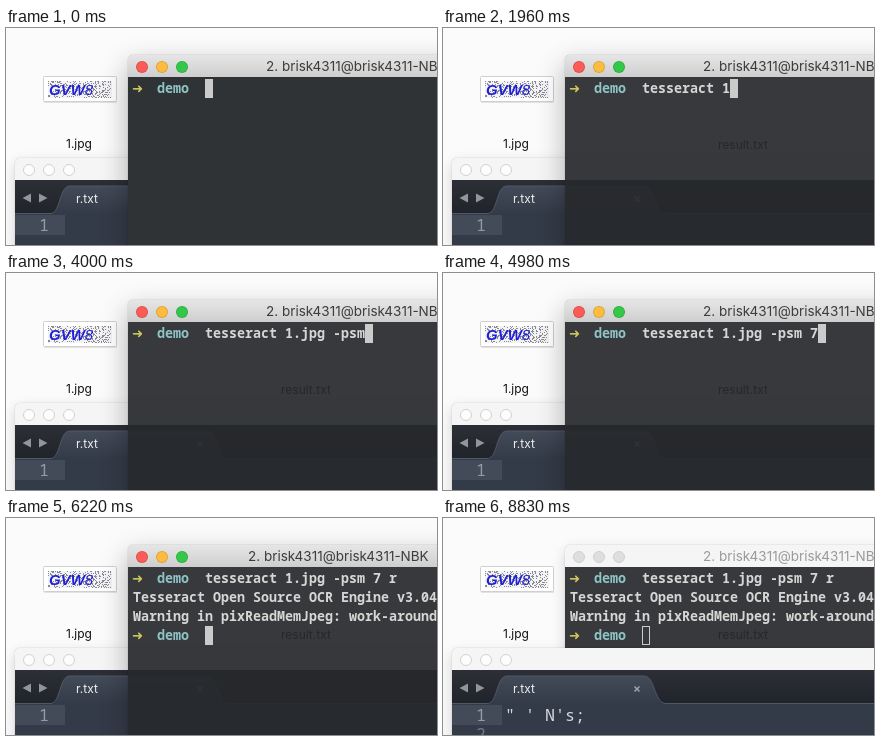
Recreate the animation shown at these times as an HTML page. Size 431 px wide and 217 px high, loop 8.93 s.

```html
<!DOCTYPE html>
<html lang="en">
<head>
<meta charset="utf-8">
<title>Terminal demo</title>
<style>
  html, body { margin: 0; width: 100%; height: 100%; overflow: hidden; background: #fbfbfb; }
  #stage { position: relative; width: 431px; height: 217px; overflow: hidden; background: #fbfbfb; }
  svg { position: absolute; left: 0; top: 0; overflow: hidden; }
  text { white-space: pre; }
  .ui { font: 12px Inter, "Open Sans", sans-serif; }
  .mono { font: 600 13.33px "Noto Sans Mono", "DejaVu Sans Mono", monospace; fill: #d6d6d4; }
  .code { font: 16.67px "Noto Sans Mono", "DejaVu Sans Mono", monospace; }
  .arrow { font: 13.3px "DejaVu Sans", sans-serif; fill: #cfc75e; }
  .dir { fill: #8fc4c6; }
  .win { position: absolute; width: 620px; height: 400px; border-radius: 5px 5px 0 0;
         box-shadow: 0 5px 14px rgba(0,0,0,.16), 0 0 1px rgba(0,0,0,.4); }
  .win.active { box-shadow: 0 10px 28px rgba(0,0,0,.3), 0 0 1px rgba(0,0,0,.5); }
  .bar { height: 22px; border-radius: 5px 5px 0 0; background: #f5f5f5; }
  .active .bar { background: linear-gradient(#e6e6e6, #cecece); }
  .light { position: absolute; top: 5.5px; width: 12px; height: 12px; border-radius: 50%;
           box-sizing: border-box; border: 1px solid #d2d2d2; background: #fdfdfd; }
  .light:nth-child(1) { left: 8px; }
  .light:nth-child(2) { left: 28px; }
  .light:nth-child(3) { left: 48px; }
  .active .light { border-color: rgba(0,0,0,.12); }
  .active .light:nth-child(1) { background: #fc5b57; }
  .active .light:nth-child(2) { background: #fdbc40; }
  .active .light:nth-child(3) { background: #34c84a; }
  #term { left: 122px; top: 27px; z-index: 2; }
  #term .light { border-color: #d0d0d0; background: #dedede; }
  #term.active .light { border-color: rgba(0,0,0,.12); }
  #term.active .light:nth-child(1) { background: #fc5b57; }
  #term.active .light:nth-child(2) { background: #fdbc40; }
  #term.active .light:nth-child(3) { background: #34c84a; }
  #screen { height: 378px; }
  #termText { z-index: 2; }
  #title { font: 13.5px Inter, "Open Sans", sans-serif; }
  #editor { left: 9px; top: 130px; z-index: 1; }
  #editor.front { z-index: 3; }
  #pane { left: 0; top: 22px; }
</style>
</head>
<body>
<div id="stage">
  <svg width="431" height="217">
    <rect x="38" y="50" width="73" height="25" rx="1" fill="#000" opacity=".1"/>
    <rect x="37.5" y="48.5" width="73" height="25" rx="1" fill="#fff" stroke="#cfcfcf"/>
    <rect x="42" y="53" width="64" height="17" fill="#f3f3f5"/>
    <path id="noise" stroke="#8a8a92" fill="none"/>
    <text x="43" y="67" font-family="Liberation Sans, sans-serif" font-size="15" font-style="italic" fill="#2020d8"><tspan font-weight="700">GVW</tspan>8</text>
    <text class="ui" x="60" y="120" fill="#111">1.jpg</text>
    <text class="ui" x="275" y="121" fill="#111">result.txt</text>
  </svg>

  <div id="editor" class="win">
    <div class="bar"><i class="light"></i><i class="light"></i><i class="light"></i></div>
    <svg id="pane" width="620" height="378">
      <defs>
        <linearGradient id="strip" x2="0" y2="1"><stop stop-color="#2c2f36"/><stop offset="1" stop-color="#20232a"/></linearGradient>
        <linearGradient id="tab" x2="0" y2="1"><stop stop-color="#434a58"/><stop offset="1" stop-color="#343b48"/></linearGradient>
      </defs>
      <rect width="620" height="34" fill="url(#strip)"/>
      <rect y="34" width="620" height="344" fill="#343b48"/>
      <path d="M36 34C46 32 44 6 55 6H192C203 6 202 32 213 34Z" fill="url(#tab)"/>
      <path d="M0 33.500H36C46 32 44 6 55 6H192C203 6 202 32 213 33.500H620" fill="none" stroke="#505868"/>
      <path d="M16 13.500V22.500L7.500 18ZM24 13.500V22.500L32.500 18Z" fill="#92969c"/>
      <text class="ui" x="61" y="23" fill="#f0f0f0">r.txt</text>
      <path d="M182.500 16.500l5 5m0-5l-5 5" stroke="#a4a8b0" stroke-width="1.400"/>
      <rect y="35" width="50" height="20" fill="#434b59"/>
      <text class="code" x="24" y="51" fill="#939baa">1</text>
      <g id="result" class="code">
        <text x="24" y="70" fill="#737b8a">2</text>
        <text x="53" y="51" fill="#d3d9e0">" ' N's;</text>
      </g>
    </svg>
  </div>

  <div id="term" class="win">
    <div class="bar"><i class="light"></i><i class="light"></i><i class="light"></i></div>
    <div id="screen"></div>
    <svg width="309" height="190" viewBox="122 27 309 190">
      <text id="title" y="43">2. brisk4311@brisk4311-NBK</text>
      <text class="arrow" x="126" y="65">➜</text>
      <text class="mono dir" x="151" y="65">demo</text>
      <text class="mono" id="command" x="199" y="65"></text>
      <text class="mono" id="version" x="127" y="84">Tesseract Open Source OCR Engine v3.04.00 with Leptonica</text>
      <text class="mono" id="warning" x="127" y="103">Warning in pixReadMemJpeg: work-around: writing to a temp file</text>
      <g id="prompt">
        <text class="arrow" x="126" y="122">➜</text>
        <text class="mono dir" x="151" y="122">demo</text>
      </g>
      <rect id="cursor"/>
    </svg>
  </div>
</div>

<script>
const LOOP = 8930, COL = 8, ROW = 19;
const $ = id => document.getElementById(id);
const command = 'tesseract 1.jpg -psm 7 r';

// [time, characters of the command shown, mistyped tail]
const typing = [
  [0, 0], [350, 1], [530, 2], [800, 3], [890, 4], [1070, 10], [1960, 11], [2050, 12],
  [2220, 13], [2310, 14], [2400, 15], [2480, 16], [2570, 17],
  [3020, 17, 's'], [3290, 17, 'sp'], [3560, 17, 's'], [3650, 17],
  [3820, 18], [3910, 19], [4000, 20], [4260, 21], [4440, 21, '6'], [4800, 21],
  [4980, 22], [5070, 23], [5240, 24]
];

function typedAt(t) {
  const [, count, typo = ''] = typing.filter(step => step[0] <= t).pop();
  return command.slice(0, count) + typo;
}

function show(id, visible) {
  $(id).setAttribute('visibility', visible ? 'visible' : 'hidden');
}

function placeCursor(x, y, hollow) {
  const inset = hollow ? 0.5 : 0;
  const attrs = {
    x: x + inset, y: y + inset, width: COL - 2 * inset, height: ROW - 2 * inset,
    fill: hollow ? 'none' : '#cbcbcb', stroke: hollow ? '#cbcbcb' : 'none'
  };
  for (const name in attrs) $('cursor').setAttribute(name, attrs[name]);
}

function screenColor(t) {
  if (t < 90) return '#2f3335';
  return t < 170 ? 'rgba(42,46,48,.96)' : 'rgba(38,41,44,.92)';
}

function render(t) {
  const switched = t >= 6660;
  const text = typedAt(t);
  $('term').classList.toggle('active', !switched);
  $('editor').classList.toggle('front', switched);
  $('editor').classList.toggle('active', t >= 6750 && t < 8830);
  $('screen').style.background = screenColor(t);
  $('title').setAttribute('x', t >= 5330 && !switched ? 242 : 260);
  $('title').setAttribute('fill', switched ? '#9a9a9a' : '#3c3c3c');
  $('command').textContent = text;
  show('version', t >= 5420);
  show('warning', t >= 5510);
  show('prompt', t >= 5590);
  show('result', switched);

  if (t < 5330) placeCursor(199 + text.length * COL, 51);
  else if (t < 5590) placeCursor(127, 51 + ROW * (t < 5420 ? 1 : t < 5510 ? 2 : 3));
  else placeCursor(199, 108, switched);
}

function speckle() {
  let seed = 7, path = '';
  const random = () => (seed = seed * 16807 % 2147483647) / 2147483647;
  for (let i = 0; i < 330; i++) {
    const x = 42 + Math.floor(random() * 63);
    const y = 53.5 + Math.floor(random() * 17);
    path += `M${x} ${y}h1`;
  }
  $('noise').setAttribute('d', path);
}

speckle();
const start = performance.now();
function tick() {
  render((performance.now() - start) % LOOP);
  requestAnimationFrame(tick);
}
tick();
</script>
</body>
</html>
```
